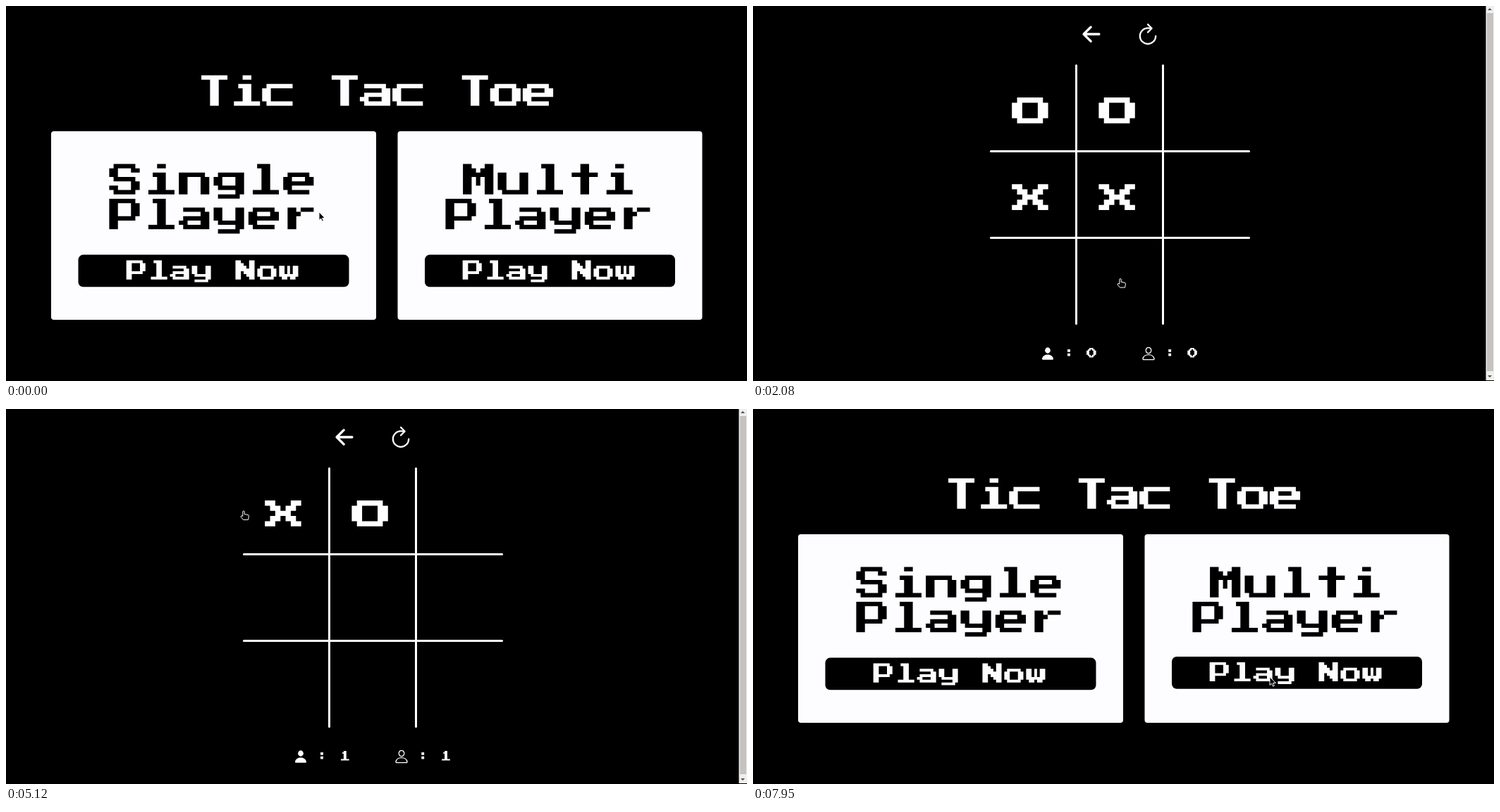
Write an HTML page with a canvas that moves like this. It is 1051x533 px and loops after 7.99 s.

```html
<!DOCTYPE html>
<html lang="en">
<head>
<meta charset="utf-8">
<title>Tic Tac Toe</title>
<style>
  html, body { margin: 0; width: 100%; height: 100%; overflow: hidden; background: #000; }
  canvas { display: block; }
</style>
</head>
<body>
<canvas id="stage" width="1051" height="533" role="img" aria-label="Tic Tac Toe: single player, multi player, play now"></canvas>
<script>
const ctx = document.getElementById('stage').getContext('2d');
const LOOP = 7990, OPEN = 640, CLOSE = 7620;
const PAPER = '#fdfdff', WHITE = '#fff', BLACK = '#000';

// Letters share these pen strokes; the pen is two columns wide and one row high.
const ROOF = 'M1 2H4', LEFT = 'M0 3V5', RIGHT = 'M5 3V5', FLOOR = 'M1 6H4', FOOT = 'M1 6H5';
const TAIL = 'M5 2V6M1 5H5M1 7H4';
const GLYPHS = {
  T: 'M1 0H5M3 0V6',
  S: 'M1 0H4M0 1V2M5 1h.01M1 3H4M5 4V5M0 5h.01' + FLOOR,
  P: 'M0 6V0H4M5 1V3M0 4H4',
  M: 'M0 0V6M5 0V6M1 1V2H4V1',
  N: 'M0 0V6M5 0V6M1 1h.01M2 2V3H3V4M4 5h.01',
  a: ROOF + RIGHT + 'M1 4H5M0 5h.01' + FOOT,
  c: 'M1 2H5' + LEFT + FOOT,
  e: ROOF + LEFT + 'M5 3V4H0' + FLOOR,
  g: 'M1 2H5M0 3V4' + TAIL,
  i: 'M3 0h.01M2 2H3V6' + FOOT,
  l: 'M2 0H3V6' + FOOT,
  n: 'M0 6V2H4M5 3V6',
  o: ROOF + LEFT + RIGHT + FLOOR,
  r: 'M1 6V2M4 2H5M2 3h.01',
  t: 'M3 0V6M1 2H5',
  u: 'M0 2V5M5 2V6H1',
  w: 'M0 2V5H5V2M1 6h.01M4 6h.01',
  x: 'M0 2h.01M5 2h.01M1 3h.01M4 3h.01M2 4H3M1 5h.01M4 5h.01M0 6h.01M5 6h.01',
  y: 'M0 2V4' + TAIL,
  0: 'M2 0H3M1 1h.01M4 1h.01M0 2V4M5 2V4M1 5h.01M4 5h.01M2 6H3',
  1: 'M2 1H3M3 0V6' + FOOT,
  2: 'M1 0H4M0 1h.01M5 1V2H4M2 3H4M1 4H3M0 5H1M0 6H5',
  ':': 'M2 1V2M2 4V5'
};
const INNER_STEMS = { M: [3, 2], w: [2, 3] };

// Halving x lets a square pen of width 1 act as the wide pen.
for (const ch in GLYPHS) {
  const path = new Path2D();
  path.addPath(new Path2D(GLYPHS[ch]), new DOMMatrix([0.5, 0, 0, 1, 0.5, 0.5]));
  GLYPHS[ch] = path;
}

function write(text, x, y, unit, color, advance = unit * 8) {
  ctx.strokeStyle = ctx.fillStyle = color;
  ctx.lineWidth = 1;
  ctx.lineCap = 'square';
  ctx.lineJoin = 'miter';
  [...text].forEach((ch, i) => {
    if (!GLYPHS[ch]) return;
    ctx.save();
    ctx.translate(x + i * advance, y);
    ctx.scale(unit * 2, unit);
    ctx.stroke(GLYPHS[ch]);
    if (INNER_STEMS[ch]) {
      const [top, height] = INNER_STEMS[ch];
      ctx.fillRect(1.5, top, 0.5, height);
    }
    ctx.restore();
  });
}

function writeCentered(text, cx, y, unit, color, advance = unit * 8) {
  write(text, cx - text.length * advance / 2, y, unit, color, advance);
}

function box(x, y, w, h, r, color) {
  ctx.fillStyle = color;
  ctx.beginPath();
  ctx.roundRect(x, y, w, h, r);
  ctx.fill();
}

// Icons live in a 512 unit square and are placed by their centre.
function icon(cx, cy, scale, path, width) {
  ctx.save();
  ctx.translate(cx, cy);
  ctx.scale(scale, scale);
  ctx.translate(-256, -256);
  ctx.lineCap = ctx.lineJoin = 'round';
  ctx.lineWidth = width;
  ctx.strokeStyle = ctx.fillStyle = WHITE;
  if (width) ctx.stroke(path); else ctx.fill(path);
  ctx.restore();
}

const BACK = new Path2D('M244 400L100 256l144-144M120 256h292');
const RELOAD = new Path2D('M320 146s24-12-64-12a160 160 0 1 0 160 160M256 58l80 80-80 80');
const PERSON = new Path2D('M256 40a96 104 0 1 0 .1 0zM256 296C168 296 72 345 56 442c-2 16 8 30 24 30h352c16 0 26-14 24-30C440 345 344 296 256 296z');
const ARROW = new Path2D('M0 0V11.5L2.7 9.2L4.5 13.2L6.4 12.3L4.6 8.4H8z');
const HAND = new Path2D('M-1.2 7V.6Q0-1 1.2.6V4.6L6 5.4Q7.6 5.8 7.4 7.4L6.6 12.4H-.6L-3.8 8.4Q-4 6.4-2.6 6.6z');

const smooth = f => f * f * (3 - 2 * f);
const ramp = (t, start, length) => smooth(Math.min(1, Math.max(0, (t - start) / length)));

// The visitor plays a cell every `step` ms and the reply follows; cells count from 0 at top left.
const REPLY = 110, PAUSE = 250;
const rounds = [
  { start: 1330, step: 400, cells: '304172' },
  { start: 2830, step: 650, cells: '31465' },
  { start: 4800, step: 600, cells: '0143682' }
].map(({ start, step, cells }) => {
  const moves = [...cells].map((cell, i) => ({
    t: start + (i >> 1) * step + i % 2 * REPLY,
    mark: 'xo'[i % 2],
    col: cell % 3,
    row: Math.floor(cell / 3)
  }));
  const last = moves[moves.length - 1];
  return { moves, winner: last.mark, won: last.t + 50, end: last.t + PAUSE };
});
const score = (mark, t) => rounds.filter(r => r.winner === mark && t >= r.won).length;

// The pointer eases through every clicked cell and a few points beside them.
const clicks = rounds.flatMap(r => r.moves)
  .filter(m => m.mark === 'x')
  .map(m => [m.t, 398 + m.col * 123, 147 + m.row * 123]);
const stops = [
  [0, 444, 293], [400, 430, 372], [800, 430, 372], [1020, 426, 348],
  [3000, 498, 269], [5120, 337, 145], [6240, 509, 387],
  [7290, 489, 47], [7460, 488, 44], [7600, 488, 44], [7930, 733, 381], [LOOP, 733, 381],
  ...clicks
].sort((a, b) => a[0] - b[0]);

function pointerAt(t) {
  const i = stops.findIndex(s => s[0] > t);
  const [t0, x0, y0] = stops[i - 1], [t1, x1, y1] = stops[i];
  const f = ramp(t, t0, t1 - t0);
  return [x0 + (x1 - x0) * f, y0 + (y1 - y0) * f];
}

function drawCard(x, w, lines, lift) {
  const cx = x + w / 2, top = 353.6 - 1.6 * lift;
  box(x, 178, w, 268, 4, PAPER);
  lines.forEach((line, i) => writeCentered(line, cx, 224.5 + 49.6 * i, 6.17, BLACK));
  box(x + 38.5, top, w - 77, 45.7, 7, BLACK);
  writeCentered('Play Now', cx, top + 8, 3.87, PAPER);
}

function drawMenu(t) {
  writeCentered('Tic Tac Toe', 525, 98.5, 6.17, PAPER, 46.2);
  drawCard(64, 461, ['Single', 'Player'], t < OPEN ? ramp(t, 250, 150) : 0);
  drawCard(555.5, 432, ['Multi', 'Player'], ramp(t, 7840, 100));
}

function triangle(y, d) {
  ctx.fillStyle = '#505050';
  ctx.beginPath();
  ctx.moveTo(1042, y + d);
  ctx.lineTo(1048, y + d);
  ctx.lineTo(1045, y - 2 * d);
  ctx.fill();
}

function drawScrollbar() {
  box(1039.5, 0, 11.5, 532, 0, '#f0efed');
  box(1041, 10, 9, 509, 0, '#c6c2bf');
  triangle(5, 1);
  triangle(526, -1);
}

function drawBoard(t) {
  for (const d of [0, 123]) {
    box(457 + d, 83, 3, 370, 1.5, WHITE);
    box(336, 205 + d, 369, 3, 1.5, WHITE);
  }
  const round = rounds.find(r => t < r.end);
  if (!round) return;
  for (const { t: at, mark, col, row } of round.moves) {
    if (t >= at) write(mark, 367.2 + col * 123.2, 115.4 + row * 123.2, 7.34, WHITE);
  }
}

function drawGame(t) {
  icon(480 - 3 * ramp(t, 7310, 130), 40, 0.07, BACK, 48);
  icon(560, 40, 0.07, RELOAD, 32);
  drawBoard(t);
  icon(418, 494, 0.04, PERSON, 0);
  write(': ' + score('x', t), 442.2, 486, 1.93, WHITE);
  icon(561, 494, 0.04, PERSON, 34);
  write(': ' + score('o', t), 585.4, 486, 1.93, WHITE);
  drawScrollbar();
}

function drawPointer(t, shape) {
  ctx.save();
  ctx.translate(...pointerAt(t));
  ctx.lineJoin = 'round';
  ctx.lineWidth = 1;
  ctx.fillStyle = BLACK;
  ctx.strokeStyle = WHITE;
  ctx.fill(shape);
  ctx.stroke(shape);
  ctx.restore();
}

let begin;
function frame(now) {
  begin ??= now;
  const t = (now - begin) % LOOP;
  const playing = t >= OPEN && t < CLOSE;
  ctx.fillStyle = BLACK;
  ctx.fillRect(0, 0, 1051, 533);
  if (playing) drawGame(t); else drawMenu(t);
  drawPointer(t, playing ? HAND : ARROW);
  requestAnimationFrame(frame);
}
requestAnimationFrame(frame);
</script>
</body>
</html>
```
